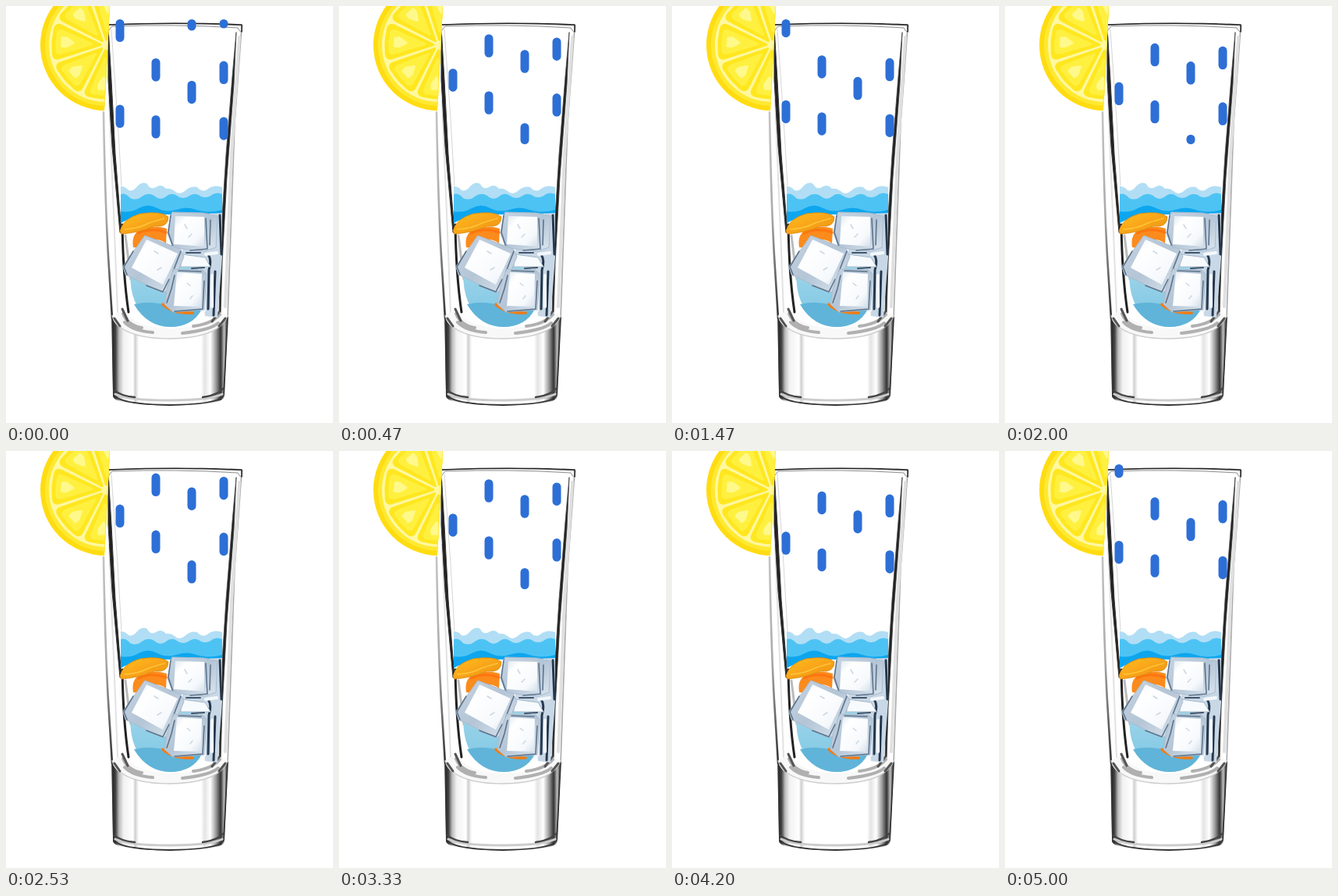
Recreate the animation shown at these times as an HTML page. Size 419 by 534 pixels, loop 5.03 s.

```html
<!DOCTYPE html>
<html lang="en">
<head>
<meta charset="utf-8">
<title>Filling glass</title>
<style>
  html, body { margin: 0; width: 100%; height: 100%; overflow: hidden; background: #fff; }
  svg { display: block; width: 100vw; height: 100vh; }
</style>
</head>
<body>
<svg viewBox="0 0 419 534" fill="none" stroke-linecap="round" stroke-linejoin="round">
  <defs>
    <linearGradient id="stem">
      <stop offset="0" stop-color="#222"/>
      <stop offset=".03" stop-color="#444"/>
      <stop offset=".06" stop-color="#bbb"/>
      <stop offset=".1" stop-color="#f2f2f2"/>
      <stop offset=".18" stop-color="#fff"/>
      <stop offset=".2" stop-color="#d0d0d0"/>
      <stop offset=".23" stop-color="#fff"/>
      <stop offset=".77" stop-color="#fff"/>
      <stop offset=".8" stop-color="#e4e4e4"/>
      <stop offset=".85" stop-color="#fff"/>
      <stop offset=".9" stop-color="#999"/>
      <stop offset=".94" stop-color="#333"/>
      <stop offset=".97" stop-color="#bbb"/>
      <stop offset="1" stop-color="#333"/>
    </linearGradient>
    <linearGradient id="wall" x1="0" y1="136" x2="0" y2="400" gradientUnits="userSpaceOnUse">
      <stop offset="0" stop-color="#c4c4c4"/>
      <stop offset=".5" stop-color="#aaa"/>
      <stop offset="1" stop-color="#333"/>
    </linearGradient>
    <linearGradient id="bowl" x1="0" y1="0" x2="0" y2="1">
      <stop offset="0" stop-color="#9fd6ea"/>
      <stop offset="1" stop-color="#7cc5e3"/>
    </linearGradient>
    <linearGradient id="face" x1="0" y1="0" x2="1" y2="1">
      <stop offset="0" stop-color="#dfe8f0"/>
      <stop offset=".25" stop-color="#fff"/>
      <stop offset=".75" stop-color="#f6f9fc"/>
      <stop offset="1" stop-color="#d3dfea"/>
    </linearGradient>
    <linearGradient id="side" x1="0" y1="0" x2="1" y2="1">
      <stop offset="0" stop-color="#c6d4e2"/>
      <stop offset=".5" stop-color="#b4c5d6"/>
      <stop offset="1" stop-color="#dce6ef"/>
    </linearGradient>
    <linearGradient id="peel" x1="0" y1="0" x2="1" y2="1">
      <stop offset="0" stop-color="#ffc01c"/>
      <stop offset=".5" stop-color="#f9a51a"/>
      <stop offset="1" stop-color="#e9920f"/>
    </linearGradient>
    <clipPath id="cut"><path d="M0 0H133L126 136H0Z"/></clipPath>
  </defs>

  <!-- glass walls -->
  <path d="M125 136Q127 250 131 320L136 400" stroke="url(#wall)" stroke-width="2.6"/>
  <path d="M132 120L139 290L143 392" stroke="#e2e2e2" stroke-width="2"/>
  <path d="M131 27L135 95L140 190L148 290L146 290L136 180L131 95Z" fill="#222" stroke="#333"/>
  <path d="M135 30L143 145L148 230" stroke="#d6d6d6"/>
  <path d="M149 280Q150 345 157 392" stroke="#222" stroke-width="3"/>
  <path d="M153 294L160 350" stroke="#bbb" stroke-width="3"/>
  <path d="M302 27L293 150L284 400" stroke="#aaa" stroke-width="1.6"/>
  <path d="M299 40L289 190L281 385" stroke="#e0e0e0" stroke-width="4"/>
  <path d="M295 34L292 100L283 220L277 330L275 396L273 396L275 300L282 190L290 90Z" fill="#222" stroke="#444" stroke-width=".8"/>
  <path d="M131 24Q217 20 303 25L302 33Q299 33 297 28Q217 23 136 26L132 31Z" fill="#f4f4f4" stroke="#777" stroke-width=".8"/>
  <path d="M132 24Q217 20.5 302 24V33" stroke="#222" stroke-width="1.5"/>

  <!-- base -->
  <path d="M136 399Q145 425 210 426Q268 425 284 399L280 500Q279 511 210 511Q139 511 137 500Z" fill="url(#stem)"/>
  <path d="M136 399L138 498Q145 510 210 511Q276 510 279 498L284 399" stroke="#333" stroke-width="1.8"/>
  <path d="M140 497Q155 505 210 505Q262 505 277 497" stroke="#ccc" stroke-width="3"/>
  <path d="M139 492Q146 499 165 501M252 501Q272 498 278 490" stroke="#444" stroke-width="2.4"/>
  <path d="M136 396Q148 426 210 426Q273 425 284 396L274 392Q265 410 210 413Q163 411 151 389Z" fill="#f8f8f8"/>
  <path d="M136 397Q147 426 210 426Q273 425 284 397" stroke="#ccc" stroke-width="1.4"/>
  <path d="M150 394Q156 409 174 412M152 405Q162 416 188 418M240 410Q264 407 274 395M226 419Q262 415 272 406" stroke="#b0b0b0" stroke-width="4"/>
  <path d="M149 388L156 403M273 392L264 404M139 400L146 410M281 400L273 410" stroke="#555" stroke-width="3"/>

  <!-- liquid -->
  <path d="M160 334Q156 374 177 397Q190 411 212 411Q239 409 250 389L246 330Z" fill="url(#bowl)"/>
  <path d="M164 382Q190 376 212 386Q231 394 251 388Q240 410 212 411Q181 411 164 382Z" fill="#60b4d9"/>
  <path d="M147 231Q153 231 157 236Q163 238 168 231Q175 224 181 228Q185 236 192 232Q199 227 205 234Q211 233 216 237Q222 243 229 237Q237 230 245 232Q252 240 259 234Q267 228 277 232V264H147Z" fill="#b1def5"/>
  <path d="M147 241Q153 239 159 246Q167 250 174 244Q182 238 190 243Q198 250 205 244Q212 238 219 243Q227 249 235 243Q243 238 250 244Q258 247 265 241Q271 238 277 241V267H147Z" fill="#4dc3f4"/>
  <path d="M147 263Q160 265 170 259Q182 252 194 259Q205 265 218 261Q232 256 244 261Q260 266 277 261V268Q244 266 213 267Q171 264 147 278Z" fill="#0da6ee"/>

  <!-- orange slices -->
  <path d="M163 309Q160 292 173 286Q190 280 206 285L205 304Q188 292 179 311Z" fill="#fb8b1c"/>
  <path d="M169 291Q187 283 205 290" stroke="#ff7510" stroke-width="3"/>
  <path d="M146 288Q150 272 172 266Q199 262 208 270Q208 284 190 282Q172 290 148 292Z" fill="url(#peel)" stroke="#d98a12" stroke-width=".8"/>
  <path d="M152 286Q170 285 183 278Q195 274 203 272" stroke="#fdc53a" stroke-width="1.5"/>
  <path d="M201 382Q213 394 239 393" stroke="#f37b12" stroke-width="3.5"/>

  <!-- ice -->
  <path d="M253 266L277 265V322L271 399L255 397L249 337L225 332L226 312H257Z" fill="#c9d8e6"/>
  <path d="M274 268L276 318M259 318Q264 326 260 338L259 388M268 340L266 396" stroke="#26384d" stroke-width="3"/>
  <path d="M263 268L266 305M256 318L270 316M254 343V390M264 345V385" stroke="#f4f8fc" stroke-width="4"/>
  <path d="M226 318L255 322L262 334L224 334Z" fill="#f8fbfd" stroke="#a5b8ca"/>
  <path d="M231 316L249 316M238 336L254 335" stroke="#42566c" stroke-width="2"/>
  <g id="ice"></g>

  <g id="lemon" clip-path="url(#cut)"></g>
  <g id="drops" stroke="#2d6fd6" stroke-width="11"></g>
</svg>
<script>
const add = (parent, tag, attrs) => {
  const el = document.createElementNS('http://www.w3.org/2000/svg', tag);
  for (const key in attrs) el.setAttribute(key, attrs[key]);
  return document.getElementById(parent).appendChild(el);
};
const shape = (parent, d, fill, stroke = 'none', width = 1) =>
  add(parent, 'path', { d, fill, stroke, 'stroke-width': width });

// Each cube: outline, front face, shadow lines
[
  ['M213 264L253 265L271 269L269 309L255 314L214 310L207 291Z', 'M217 269L254 270L254 308L215 305Z',
   'M211 268L208 290L214 308M256 272L258 311L236 313M262 274L261 306'],
  ['M178 294L223 311L228 321L210 364L201 367L153 344L150 334Z', 'M180 299L220 317L201 357L161 335Z',
   'M163 314L151 334L155 344M180 358L201 366L209 350M224 314L214 340'],
  ['M215 337L252 338L257 343L254 389L214 392L203 382L206 363Z', 'M219 341L251 343L250 385L215 384Z',
   'M216 345L212 362L206 380M216 391L252 388L254 352M221 339L250 340']
].forEach(([body, face, shadow]) => {
  shape('ice', body, 'url(#side)', '#a9bbcc');
  shape('ice', face, 'url(#face)');
  shape('ice', shadow, 'none', '#5d748c', 1.6);
});
shape('ice', 'M229 280l3 5M238 292l-4 4M190 314l5 3M199 335l-5 3M232 355l4 3M239 371l-3 4', 'none', '#cbd8e4', 1.5);

// Lemon wheel
const disc = (r, fill) => add('lemon', 'circle', { cx: 128, cy: 50, r, fill });
disc(84, '#ffdc12');
disc(78, '#ffe931');
disc(73, '#fff8a0');
const wedge = (angle, near, far, spread, fill) => {
  const point = (r, a) => {
    const t = (angle + a) * Math.PI / 180;
    return `${(128 + r * Math.cos(t)).toFixed(1)} ${(50 + r * Math.sin(t)).toFixed(1)}`;
  };
  shape('lemon', `M${point(near, 0)}L${point(far - 5, -spread)}Q${point(far + 3, -spread)} ${point(far, -spread / 2)}` +
    `Q${point(far + 1, 0)} ${point(far, spread / 2)}Q${point(far + 3, spread)} ${point(far - 5, spread)}Z`, fill, fill, 3);
};
for (let i = 0; i < 8; i++) {
  const angle = 4 + 45 * i;
  wedge(angle, 7, 68, 19.5, '#ffe720');
  wedge(angle, 18, 63, 14, '#fff040');
  wedge(angle, 42, 56, 6, '#fff98c');
}
shape('lemon', 'M133 0L126 133', 'none', '#ffe43a', 1.5);

// Falling drops: [x, start of the first dash, spacing]
const TOP = 22.5, BOTTOM = 171.5, DASH = 18.5, STEPS = 19, LOOP = 5030;
const drops = [[146, 22, 110], [192, -0.5, 73], [238, 7.5, 93.7], [279, 4.5, 71.6]].map(([x, start, gap]) => ({
  start, gap,
  el: add('drops', 'path', { d: `M${x} ${TOP}V${BOTTOM}`, 'stroke-dasharray': `${DASH} ${gap - DASH}` })
}));

// A 38 ms cycle shown at 25 fps on a 30 fps clock
function draw(now) {
  const tick = Math.min(150, Math.floor((now % LOOP + 3.4) * 0.03));
  const shown = Math.floor(tick * 5 / 6);
  const step = Math.floor(shown * 40 / 38) % STEPS;
  for (const { el, start, gap } of drops)
    el.setAttribute('stroke-dashoffset', TOP - start - gap * step / STEPS);
}
const begin = performance.now();
const frame = () => {
  draw(performance.now() - begin);
  requestAnimationFrame(frame);
};
frame();
</script>
</body>
</html>
```
